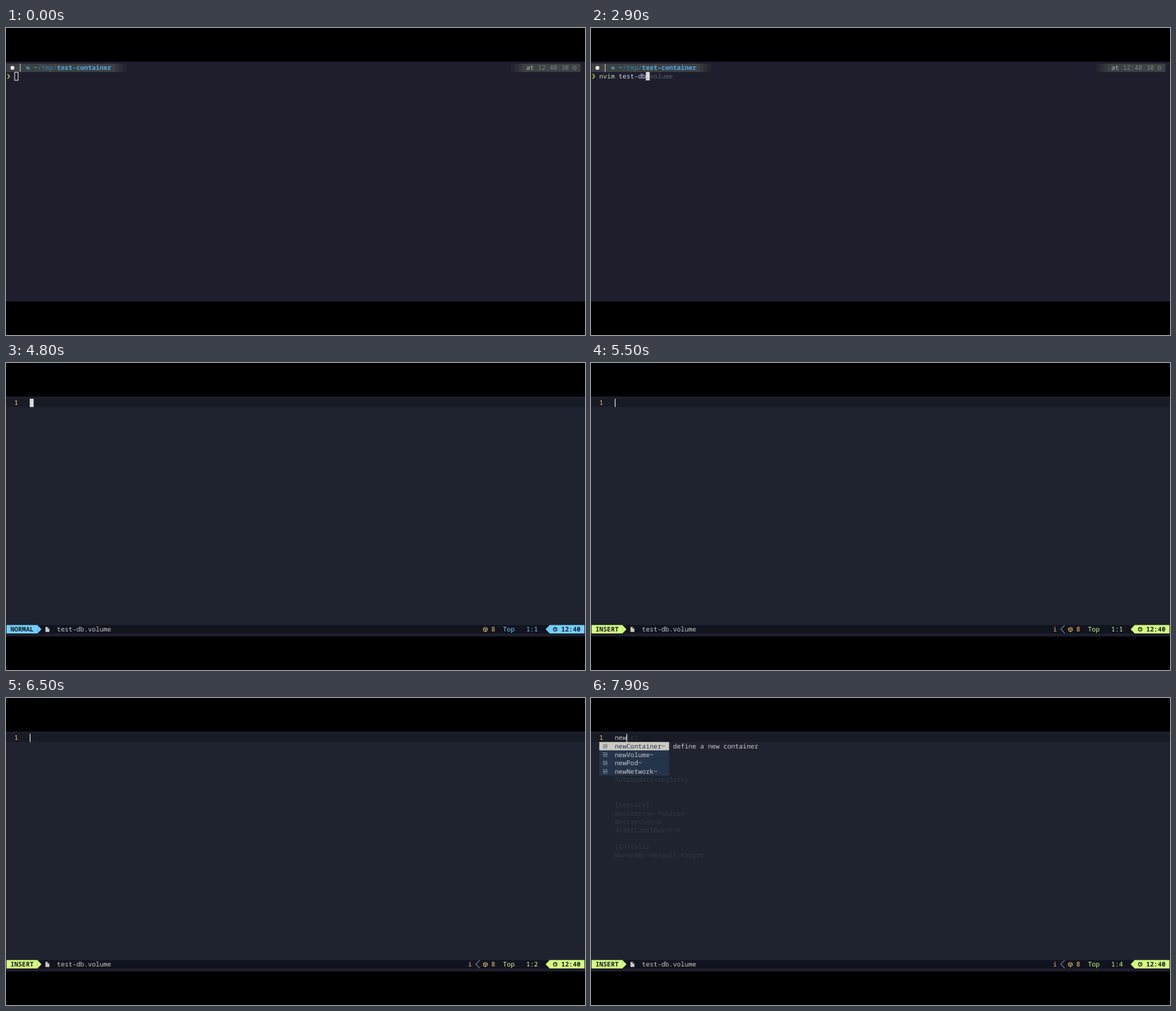
These frames come from a looping animation (870 by 462 pixels, 8000 ms). An HTML page with a canvas:

```html
<!DOCTYPE html>
<html lang="en">
<head>
<meta charset="utf-8">
<title>Terminal session</title>
<style>
html, body { margin: 0; height: 100%; overflow: hidden; background: #000; }
canvas { display: block; }
</style>
</head>
<body>
<canvas id="stage" width="870" height="462"></canvas>
<script>
const ctx = document.getElementById('stage').getContext('2d');
const LOOP = 8000;
const CELL_W = 5.828, CELL_H = 12.62;
const colX = col => 0.8 + col * CELL_W;
const rowY = row => 53.6 + row * CELL_H;

const shell = {
  bg: '#1e1e2d', text: '#cdd6f4', command: '#c3daa2', error: '#e06c75', ghost: '#5c5f6c',
  cursor: '#dcdcda', arrow: '#add632', segment: [60, 65, 67], path: '#3f7fa8', pathBold: '#58a9e4'
};
const editor = {
  bg: '#1f232f', line: '#171b24', bar: '#10141f', text: '#cccac2', ghost: '#323844',
  menu: '#23344b', yellow: '#ffcc66', orange: '#ffad66', insert: '#d5ff80', normal: '#73d0ff'
};

// [time, number of characters present from this moment]
const COMMAND = 'nvim test-db.volume';
const commandKeys = [
  [0, 0], [1000, 1], [1100, 2], [1200, 3], [1400, 4], [1600, 5],
  [1900, 6], [2000, 7], [2100, 8], [2200, 9], [2500, 10], [2700, 11],
  [2900, 12], [3100, 13], [3600, 14], [3700, 15], [3900, 16],
  [4100, 17], [4200, 18], [4300, 19]
];
// [time, typed text, cursor column, menu open, description shown]
const editorKeys = [
  [4700, '', 1, false, false],
  [5600, 'e', 2, false, false],
  [5700, 'ew', 3, true, false],
  [5900, 'ew', 3, true, true],
  [6400, 'e', 2, true, false],
  [6500, '', 2, false, false],
  [6600, '', 1, false, false],
  [6800, 'ne', 3, true, false],
  [6900, 'new', 4, true, false],
  [7200, 'new', 4, true, true]
];
const current = (keys, t) => keys.filter(key => key[0] <= t).pop();

const snippet = {
  0: '[Unit]', 5: 'AutoUpdate=registry', 8: '[Service]', 9: 'Restart=on-failure',
  10: 'RestartSec=5', 11: 'StartLimitBurst=5', 13: '[Install]', 14: 'WantedBy=default.target'
};
const menuItems = ['newContainer~', 'newVolume~', 'newPod~', 'newNetwork~'];

function rect(x, y, w, h, color) {
  ctx.fillStyle = color;
  ctx.fillRect(x, y, w, h);
}

function cells(col, row, count, color) {
  rect(colX(col), rowY(row), count * CELL_W, CELL_H, color);
}

function write(text, col, row, color, bold = false) {
  ctx.font = `${bold ? 'bold ' : ''}9.71px "Noto Sans Mono", "DejaVu Sans Mono", monospace`;
  ctx.fillStyle = color;
  [...text].forEach((char, i) => ctx.fillText(char, colX(col + i), rowY(row) + 9.7));
}

function line(points, color, width = 1, close = false) {
  ctx.beginPath();
  points.forEach(([x, y]) => ctx.lineTo(x, y));
  if (close) ctx.closePath();
  ctx.strokeStyle = color;
  ctx.lineWidth = width;
  ctx.stroke();
}

function polygon(points, color) {
  ctx.beginPath();
  points.forEach(([x, y]) => ctx.lineTo(x, y));
  ctx.fillStyle = color;
  ctx.fill();
}

function clockIcon(x, y, color, width) {
  ctx.beginPath();
  ctx.arc(x, y, 2.7, 0, Math.PI * 2);
  ctx.strokeStyle = color;
  ctx.lineWidth = width;
  ctx.stroke();
  line([[x, y - 1.7], [x, y], [x + 1.4, y]], color, width * 0.8);
}

function promptArrow(row) {
  const y = rowY(row) + 6.5;
  line([[2.4, y - 3.5], [5.4, y], [2.4, y + 3.5]], shell.arrow, 1.4);
}

function drawPrompt() {
  const shade = alpha => `rgba(${shell.segment}, ${alpha})`;
  cells(0, 0, 28, shade(1));
  cells(133, 0, 15, shade(1));
  [0.7, 0.45, 0.2].forEach((alpha, i) => {
    cells(28 + i, 0, 1, shade(alpha));
    cells(132 - i, 0, 1, shade(alpha));
  });
  ctx.beginPath();
  ctx.arc(9.7, 60, 3, 0, Math.PI * 2);
  ctx.fillStyle = '#e6e6e0';
  ctx.fill();
  rect(20.8, 53.8, 1, 12.4, '#c8cbc4');
  polygon([[30, 57.8], [32, 57.8], [32.7, 58.6], [35, 58.6], [36, 62.3], [31, 62.3]], '#4686b4');
  write('~', 7, 0, shell.pathBold, true);
  write('/tmp/', 8, 0, shell.path);
  write('test-container', 13, 0, shell.pathBold, true);
  write('at', 134, 0, '#b9bbb8');
  write('12:40:30', 137, 0, '#7b8681');
  clockIcon(854.2, 60, '#7b8681', 0.8);
}

function drawCommand(row, count) {
  promptArrow(row);
  write(COMMAND.slice(0, Math.min(count, 4)), 2, row, count < 4 ? shell.error : shell.command);
  write(COMMAND.slice(5, Math.max(count, 5)), 7, row, shell.text);
}

function drawShell(t) {
  const count = current(commandKeys, t)[1];
  if (t >= 4400) {
    drawCommand(0, count);
    return;
  }
  drawPrompt();
  drawCommand(1, count);
  if (count > 5) write(COMMAND.slice(count), 2 + count, 1, shell.ghost);
  const col = 2 + count;
  if (t < 300) {
    ctx.strokeStyle = '#e4e4e4';
    ctx.lineWidth = 1;
    ctx.strokeRect(13, 66.7, 5.2, 12);
  } else {
    cells(col, 1, 1, shell.cursor);
    if (count > 5 && count < COMMAND.length) write(COMMAND[count], col, 1, '#6f717a');
  }
}

function snippetIcon(x, y, color) {
  ctx.setLineDash([1.8, 1.6]);
  line([[x - 2.6, y - 2.6], [x + 2.6, y - 2.6], [x + 2.6, y + 2.6], [x - 2.6, y + 2.6]], color, 1, true);
  ctx.setLineDash([]);
  rect(x - 0.8, y - 0.8, 1.6, 1.6, color);
}

function drawMenu(describe) {
  menuItems.forEach((item, i) => {
    const row = i + 1, selected = i === 0;
    const color = selected ? editor.menu : editor.text;
    cells(2, row, 18, selected ? editor.text : editor.menu);
    snippetIcon(21.4, rowY(row) + 6.4, color);
    write(item, 6, row, color);
  });
  if (describe) write('define a new container', 21, 1, editor.text);
}

function drawStatus(inserting, column) {
  const row = 27, top = rowY(row), mid = top + CELL_H / 2, bottom = top + CELL_H;
  const accent = inserting ? editor.insert : editor.normal;
  cells(0, row, 149, editor.bar);

  cells(0, row, 8, accent);
  polygon([[colX(8) - 0.2, top], [colX(9), mid], [colX(8) - 0.2, bottom]], accent);
  write(inserting ? 'INSERT' : 'NORMAL', 1, row, editor.line, true);
  polygon([[59.3, 397.2], [63, 397.2], [65.2, 399.5], [65.2, 404.8], [59.3, 404.8]], editor.text);
  polygon([[62.7, 397.2], [62.7, 399.8], [65.2, 399.8]], editor.bar);
  write('test-db.volume', 13, row, editor.text);

  if (inserting) {
    write('i', 119, row, editor.orange);
    line([[711.8, top + 0.5], [705.8, mid], [711.8, bottom - 0.5]], editor.text, 0.9);
  }
  line([[720.3, 397.8], [723.2, 399.4], [723.2, 402.8], [720.3, 404.4], [717.4, 402.8], [717.4, 399.4]],
    editor.yellow, 0.9, true);
  line([[717.4, 399.4], [720.3, 401], [723.2, 399.4]], editor.yellow, 0.9);
  line([[720.3, 401], [720.3, 404.4]], editor.yellow, 0.9);
  write('8', 125, row, editor.yellow);
  write('Top', 128, row, accent);
  write('1:' + column, 134, row, accent);

  polygon([[colX(140) + 0.2, top], [colX(139), mid], [colX(140) + 0.2, bottom]], accent);
  cells(140, row, 9, accent);
  clockIcon(825.2, mid + 0.2, editor.line, 1.1);
  write('12:40', 143, row, editor.line, true);
}

function drawEditor(t) {
  const [, typed, column, menuOpen, describe] = current(editorKeys, t);
  const inserting = t >= 5400;
  rect(colX(0), rowY(0), 149 * CELL_W, 28 * CELL_H, editor.bg);
  cells(0, 0, 149, editor.line);
  write('1', 2, 0, editor.yellow);
  if (menuOpen) {
    for (const [row, text] of Object.entries(snippet)) {
      const skip = row === '0' ? typed.length : 0;
      write(text.slice(skip), 6 + skip, +row, editor.ghost);
    }
    drawMenu(describe);
  }
  write(typed, 6, 0, editor.text);
  const cursorX = colX(6 + typed.length);
  rect(cursorX - 0.1, rowY(0) + 0.2, inserting ? 1.2 : CELL_W, CELL_H - 0.2, '#dcdcda');
  if (t >= 4800) drawStatus(inserting, column);
}

function draw(t) {
  rect(0, 0, 870, 462, '#000');
  rect(0, 50.5, 870, 361, shell.bg);
  if (t < 4700) drawShell(t);
  else drawEditor(t);
}

ctx.textRendering = 'geometricPrecision';
const start = performance.now();
function tick() {
  draw((performance.now() - start) % LOOP);
  requestAnimationFrame(tick);
}
tick();
</script>
</body>
</html>
```
